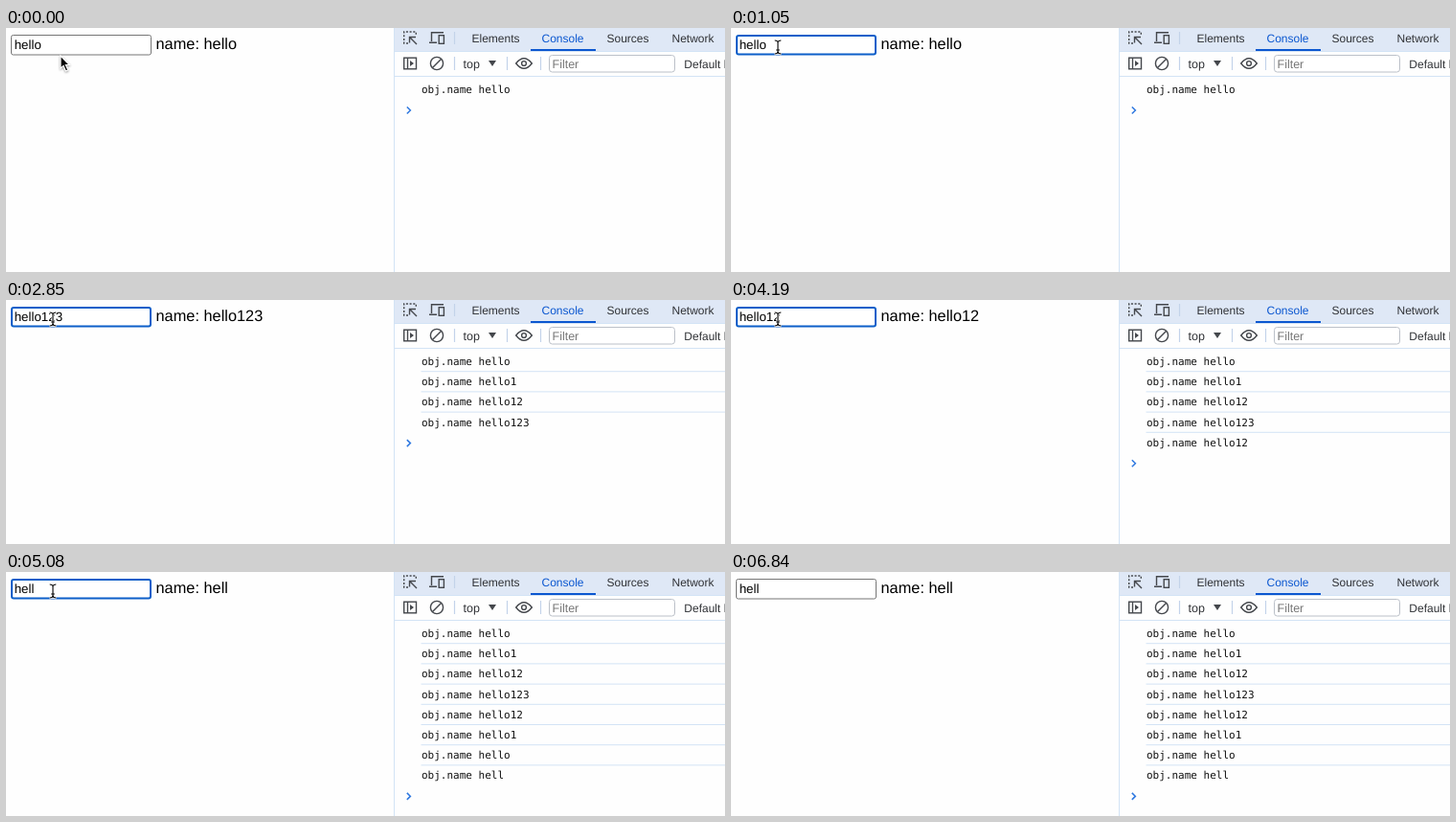
Recreate the animation shown at these times as an HTML page. Size 751x255 px, loop 6.86 s.

```html
<!DOCTYPE html>
<html lang="en">
<meta charset="utf-8">
<title>Two-way binding with console</title>
<style>
  html, body { margin: 0; width: 100%; height: 100%; overflow: hidden; background: #fefefe; }
  svg { display: block; width: 751px; height: 255px; }
  text { font: 12px "Liberation Sans", Arial, sans-serif; fill: #303236; text-rendering: geometricPrecision; white-space: pre; }
  #field { font-size: 13.333px; fill: #000; }
  #label { font-size: 16.35px; fill: #000; }
  #logs text { font: 11px "DejaVu Sans Mono", monospace; fill: #111; }
  .wide { font-size: 12.5px; }
  .icon { fill: none; stroke: #44474c; stroke-width: 1.4; }
  .rule { fill: none; stroke: #d3e3f5; }
</style>
<svg viewBox="0 0 751 255">
  <rect id="box" fill="#fff"/>
  <text id="field" x="8.7" y="22"></text>
  <rect id="caret" y="10" width="1" height="15"/>
  <text id="label" x="156.5" y="22"></text>

  <rect x="405" width="346" height="24" fill="#dfe8f6"/>
  <path class="rule" d="M405.5 0V255M405 24.5H751M405 50.5H751"/>
  <path class="rule" stroke-width="1.2" style="stroke:#c3d3ea" d="M468.5 4V17M468.5 30V44M523.5 30V44M558.5 30V44"/>
  <rect x="548" y="22" width="68" height="2" fill="#0b57d0"/>
  <text x="486.5" y="14.5">Elements</text>
  <text x="559.5" y="14.5" style="fill:#0b57d0">Console</text>
  <text x="627.5" y="14.5">Sources</text>
  <text x="695.5" y="14.5">Network</text>
  <text class="wide" x="477.5" y="41.5">top</text>
  <path d="M504 34h8l-4 6z" fill="#44474c"/>
  <rect x="567.5" y="28.5" width="131" height="17.5" rx="3" fill="#fff" stroke="#bcc1c9"/>
  <text class="wide" x="570.5" y="42" style="fill:#777">Filter</text>
  <text x="708.3" y="41.5">Default levels</text>

  <g class="icon">
    <path stroke-dasharray="2 1.7" d="M420 16H415.7V4H428.3V8.5"/>
    <path d="M421.5 9.5l7.5 7.5M421.5 15.5V9.5H428"/>
    <path d="M444.5 14V4.7H457M442 15.3H450"/>
    <rect x="452.2" y="7.7" width="5.2" height="8.6"/>
    <rect x="415.7" y="31.2" width="12.8" height="11.6"/>
    <path d="M419.5 31V43"/>
    <circle cx="450" cy="37" r="6.6"/>
    <path d="M445.5 41.5l9-9"/>
    <path d="M532.7 37Q541 26.5 549.3 37Q541 47.5 532.7 37Z"/>
    <circle cx="541" cy="37" r="2.4"/>
  </g>
  <path d="M422 34l4 3l-4 3z" fill="#44474c"/>

  <g id="logs"></g>
  <path id="prompt" d="M418.8 82.5l3.6 3.5l-3.6 3.5" fill="none" stroke="#2e78e0" stroke-width="1.5"/>

  <g id="ibeam" fill="none">
    <path id="beam" d="M-3.3 -7Q0 -7 0 -4.5V4.5Q0 7 -3.3 7M3.3 -7Q0 -7 0 -4.5V4.5Q0 7 3.3 7M-1.8 3H1.8" stroke="#fff" stroke-width="2.4"/>
    <use href="#beam"/>
    <path d="M-3.3 -7Q0 -7 0 -4.5V4.5Q0 7 -3.3 7M3.3 -7Q0 -7 0 -4.5V4.5Q0 7 3.3 7M-1.8 3H1.8" stroke="#000" stroke-width="1.1"/>
  </g>
  <path id="arrow" d="M0 0V13.2L3 10.4L5.4 16L7.8 15L5.4 9.5H9.3Z" stroke="#fff" stroke-width="1.2"
    style="filter:drop-shadow(0 1px 1px #0006)"/>
</svg>
<script>
  const LOOP = 6860, ROW = 21.2;
  const $ = id => document.getElementById(id);
  const edits = [[0, 'hello'], [1500, 'hello1'], [1950, 'hello12'], [2400, 'hello123'],
    [4190, 'hello12'], [4490, 'hello1'], [4790, 'hello'], [5080, 'hell']];
  const blinks = [600, 1050, 1500, 2850, 3450, 3900, 4340, 4940, 5380, 5820, 6420, 6840];
  const pointer = [[0, 'arrow', 57, 29], [150, 'ibeam', 53, 26.5], [300, 'ibeam', 49, 20],
    [5670, 'arrow', 77, 32], [5820, '']];

  const show = (el, on) => el.setAttribute('visibility', on ? 'visible' : 'hidden');
  const set = (el, attrs) => { for (const k in attrs) el.setAttribute(k, attrs[k]); };

  $('logs').innerHTML = edits.map(([, value], i) => {
    const y = 68 + i * ROW;
    const rule = i ? `<path class="rule" d="M433.5 ${y - 14.5}H751"/>` : '';
    return `<g>${rule}<text x="434" y="${y}">obj.name ${value}</text></g>`;
  }).join('');

  function draw(t) {
    const done = edits.filter(e => e[0] <= t);
    const value = done.at(-1)[1];
    $('field').textContent = value;
    $('label').textContent = 'name: ' + value;
    [...$('logs').children].forEach((row, i) => show(row, i < done.length));
    $('prompt').setAttribute('transform', `translate(0 ${(done.length - 1) * ROW})`);

    const focused = t >= 600 && t < 6840;
    const hovered = t >= 150 && t < 600;
    set($('box'), focused
      ? { x: 6, y: 8, width: 145, height: 19.6, rx: 2, stroke: '#0d5fc9', 'stroke-width': 2 }
      : { x: 5.5, y: 7.5, width: 146, height: 20.5, rx: 2, stroke: hovered ? '#4f4f4f' : '#767676', 'stroke-width': 1 });

    $('caret').setAttribute('x', 8.7 + $('field').getComputedTextLength());
    show($('caret'), blinks.filter(b => b <= t).length % 2);

    const [, shape, x, y] = pointer.findLast(p => p[0] <= t);
    for (const id of ['arrow', 'ibeam']) {
      show($(id), id === shape);
      if (id === shape) $(id).setAttribute('transform', `translate(${x} ${y})`);
    }
  }

  function tick() {
    draw(performance.now() % LOOP);
    requestAnimationFrame(tick);
  }
  tick();
</script>
</html>
```
